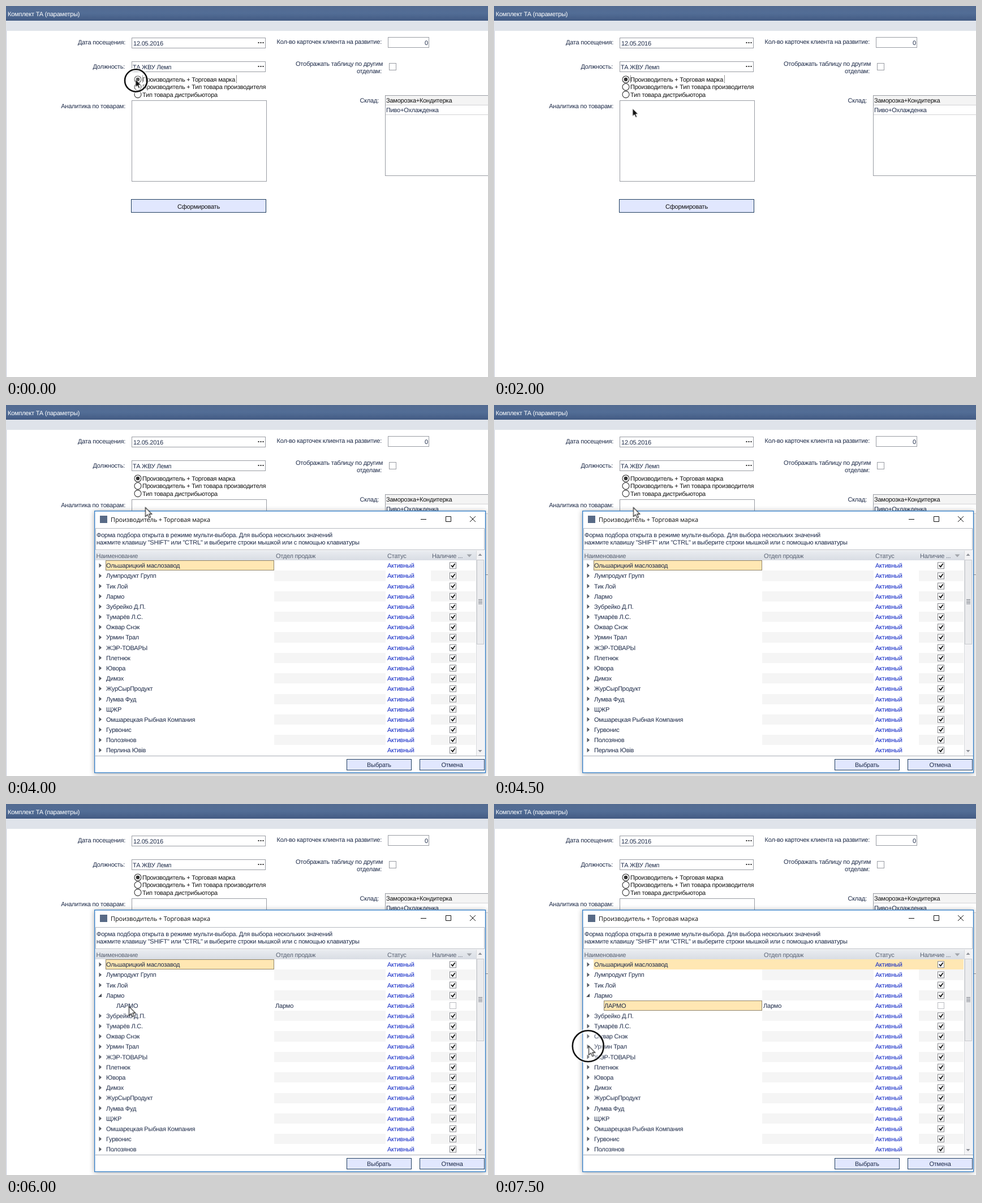
Animation of 852x657 px, one loop 8 s. Source, as an HTML page:

```html
<!DOCTYPE html>
<html lang="ru">
<head>
<meta charset="utf-8">
<title>Комплект ТА</title>
<style>
html, body { margin: 0; width: 100%; height: 100%; overflow: hidden; background: #fff; }
svg { display: block; width: 852px; height: 657px; }
text {
  font: 11px "Liberation Sans", Arial, sans-serif;
  letter-spacing: -.22px;
  text-rendering: geometricPrecision;
  fill: #1d2a48;
  white-space: pre;
}
.end { text-anchor: end; }
.mid { text-anchor: middle; }
.light { fill: #fff; }
.dark { fill: #111; }
.head { fill: #596273; }
.status { fill: #0a22c4; }
.caption { font-family: "Open Sans", "Noto Sans", sans-serif; letter-spacing: -.13px; fill: #111; }
.field { fill: #fff; stroke: #999ca3; }
.button { fill: #e1e7fe; stroke: #1f3d5e; }
.focus { fill: none; stroke: #222; stroke-dasharray: 1 1; }
.pick { fill: #ffe7b3; }
.shade { fill: #f5f5f5; shape-rendering: crispEdges; }
.frame { fill: #fff; stroke: #2c7ac6; stroke-width: 1.3; filter: drop-shadow(0 1px 5px #0005); }
.ring { fill: #fff3; stroke: #111; stroke-width: 2.6; }
.glow { fill: none; stroke: #fff; stroke-width: 7; opacity: .5; }

/* Every change is a hard cut */
.cut { animation: 8s step-end infinite; }
.press { animation-name: press; }
.tab { animation-name: tab; }
.marker { animation-name: marker; }
.dialog { animation-name: dialog; }
.closed { animation-name: closed; }
.opened { animation-name: opened; }
.shift { animation-name: shift; }
.first { animation-name: first; }
.second { animation-name: second; }
.tap { animation-name: tap; }
.move { animation-name: move; }
@keyframes press { 0% { opacity: 1 } 6.25%, to { opacity: 0 } }
@keyframes tab { 0% { opacity: 1 } 31.25%, to { opacity: 0 } }
@keyframes marker { 0% { opacity: 0 } 31.25%, to { opacity: 1 } }
@keyframes dialog { 0% { opacity: 0 } 50%, to { opacity: 1 } }
@keyframes closed { 0% { opacity: 1 } 62.5%, to { opacity: 0 } }
@keyframes opened { 0% { opacity: 0 } 62.5%, to { opacity: 1 } }
@keyframes shift { 0% { transform: none } 62.5%, to { transform: translateY(18.17px) } }
@keyframes first { 0% { opacity: 1 } 81.25%, to { opacity: 0 } }
@keyframes second { 0% { opacity: 0 } 81.25%, to { opacity: 1 } }
@keyframes tap { 0% { opacity: 0 } 93.75%, to { opacity: 1 } }
@keyframes move {
  0% { transform: translate(229px, 130px) }
  25% { transform: translate(245px, 181.5px) }
  31.25% { transform: translate(246.5px, 181.5px) }
  62.5% { transform: translate(166.5px, 342.5px) }
  68.75% { transform: translate(217.5px, 358.5px) }
  87.5%, to { transform: translate(167.5px, 428.5px) }
}
</style>
</head>
<body>
<svg id="stage" viewBox="0 0 852 657">
  <defs>
    <linearGradient id="bar" x2="0" y2="1">
      <stop stop-color="#536b91"/><stop offset=".5" stop-color="#526d96"/><stop offset="1" stop-color="#435b83"/>
    </linearGradient>
    <linearGradient id="cols" x2="0" y2="1">
      <stop stop-color="#e9ecf0"/><stop offset="1" stop-color="#d9dde4"/>
    </linearGradient>
    <clipPath id="list"><path d="M158 275H831V620.5H158Z"/></clipPath>
    <path id="arrow" d="M0 0V16L3.8 12.6L6.4 18.4L9 17.3L6.5 11.6H11.3Z"/>
  </defs>
</svg>
<script>
const text = (x, y, s, cls = '') => `<text x="${x}" y="${y}" class="${cls}">${s}</text>`;
const rect = (x, y, w, h, attr) => `<rect x="${x}" y="${y}" width="${w}" height="${h}" ${attr}/>`;
const box = (x, y, w, h, cls) => rect(x + .5, y + .5, w, h, `class="${cls}"`);
const path = (d, attr) => `<path d="${d}" ${attr}/>`;
const cut = (name, body) => `<g class="cut ${name}">${body}</g>`;
const dots = y => [446.5, 450.5, 454.5].map(x => rect(x - 1, y, 2, 2, 'fill="#222"')).join('');

const radio = (y, label, on) =>
  `<circle cx="233" cy="${y}" r="6" fill="#fff" stroke="#333" stroke-width="1.1"/>` +
  (on ? `<circle cx="233" cy="${y}" r="3.3" fill="#333"/>` : '') +
  text(241, y + 4, label, 'dark');

const ring = (x, y, r) =>
  `<circle cx="${x}" cy="${y}" r="${r}" class="glow"/><circle cx="${x}" cy="${y}" r="${r}" class="ring"/>`;

const form = () =>
  rect(0, 0, 852, 26, 'fill="url(#bar)"') + rect(0, 26, 852, 18, 'fill="#dfe3ea"') +
  rect(0, 44, 1, 613, 'fill="#c3c8d6"') +
  text(3, 17.5, 'Комплект ТА (параметры)', 'light') +
  text(211, 68, 'Дата посещения:', 'end') + box(222, 56, 236, 18, 'field') +
  text(225, 70, '12.05.2016') + dots(64) +
  text(664, 67, 'Кол-во карточек клиента на развитие:', 'end') +
  box(675, 55, 72, 18, 'field') + text(746, 68.5, '0', 'end') +
  text(210, 111, 'Должность:', 'end') + box(222, 98, 236, 18, 'field') +
  text(224, 112, 'ТА ЖВУ Лемп') + dots(106) +
  text(666, 106, 'Отображать таблицу по другим', 'end') +
  text(664, 118.5, 'отделам:', 'end') + box(677, 101, 12, 12, 'field') +
  radio(130, 'Производитель + Торговая марка', true) +
  radio(143.3, 'Производитель + Тип товара производителя') +
  radio(156.6, 'Тип товара дистрибьютора') +
  cut('tab', path('M241.5 123V137M407.5 123V137', 'class="focus"')) +
  text(211, 181, 'Аналитика по товарам:', 'end') + box(222, 167, 238, 143, 'field') +
  cut('marker', path('M228.5 191.5H232.5V189L237 193.5L232.5 198V195.5H228.5Z', 'fill="#a9a9b0" stroke="#55555c"')) +
  text(659, 171, 'Склад:', 'end') + box(670, 158, 200, 142, 'field') +
  rect(671, 159, 181, 16, 'fill="#f4f4f4"') +
  path('M671 175.5H852M671 192.5H852', 'stroke="#d3d3d6"') +
  text(672, 171, 'Заморозка+Кондитерка', 'dark') + text(672, 188, 'Пиво+Охлажденка') +
  box(221, 342, 238, 23, 'button') + text(340.5, 358.5, 'Сформировать', 'mid dark');

const makers = ['Ольшарицкий маслозавод', 'Лумпродукт Групп', 'Тик Лой', 'Лармо', 'Зубрейко Д.П.',
  'Тумарёв Л.С.', 'Ожвар Снэк', 'Урмин Трал', 'ЖЭР-ТОВАРЫ', 'Плетнюк', 'Ювора', 'Димэх',
  'ЖурСырПродукт', 'Лумва Фуд', 'ЩЖР', 'Омшарецкая Рыбная Компания', 'Гурвонис', 'Полозянов',
  'Перлина Ювів'];
const step = 18.17, top0 = 275.3;
const rowY = i => top0 + i * step;

const cells = (y, checked) =>
  text(674, y + 13, 'Активный', 'status') +
  rect(784.5, y + 3.5, 11, 11, `fill="#fff" stroke="${checked ? '#85878c' : '#b9bbc0'}"`) +
  (checked ? path(`M787 ${y + 8.5}L789.5 ${y + 11.5}L793.5 ${y + 5.8}`, 'fill="none" stroke="#111" stroke-width="1.8"') : '');
const marker = y => path(`M164.5 ${y + 5}L169 ${y + 9}L164.5 ${y + 13}Z`, 'fill="#555a63"');
const unfolded = y => path(`M169 ${y + 6}V${y + 12}H163Z`, 'fill="#444850"');
const row = (name, i) => {
  const y = rowY(i), m = marker(y);
  return (i === 3 ? cut('closed', m) + cut('opened', unfolded(y)) : m) +
    text(177, y + 13, name) + cells(y, true);
};

const rows = () => {
  let shade = '';
  for (let i = 1; i < 19; i += 2)
    shade += rect(474, rowY(i), 197, step, 'class="shade"') + rect(751, rowY(i), 79, step, 'class="shade"');
  const child = rowY(4);
  return `<g clip-path="url(#list)">${shade}` +
    cut('first', rect(176, 275, 298, 18, 'class="pick"') + box(176, 275, 297, 17, 'focus')) +
    cut('second', rect(176, 275, 654, 18, 'class="pick"') +
      rect(194, 348, 280, 18, 'class="pick"') + box(194, 348, 279, 17, 'focus')) +
    makers.slice(0, 4).map(row).join('') +
    cut('shift', makers.slice(4).map((n, i) => row(n, i + 4)).join('')) +
    cut('opened', text(195, child + 13, 'ЛАРМО') + text(476, child + 13, 'Лармо') + cells(child, false)) +
    '</g>';
};

const thumb = (h, grip) =>
  rect(832.5, 274.5, 12, h, 'fill="#ebecee" stroke="#c8cace"') +
  path([0, 2.5, 5, 7.5].map(d => `M835 ${grip + d}H842`).join(''), 'stroke="#777b84"');

const dialog = () =>
  rect(156.7, 187.8, 690.8, 463.4, 'class="frame"') +
  rect(166, 196, 13, 13, 'fill="#586a86"') +
  text(185, 206.5, 'Производитель + Торговая марка', 'caption') +
  path('M733 202.5H743M777.5 197.5H786.5V206.5H777.5ZM820 197L830 207M830 197L820 207', 'fill="none" stroke="#111"') +
  rect(158.5, 218.5, 687, 38, 'fill="#fff" stroke="#b4b8c0"') +
  text(160, 234, 'Форма подбора открыта в режиме мульти-выбора. Для выбора нескольких значений') +
  text(160, 246.5, 'нажмите клавишу "SHIFT" или "CTRL" и выберите строки мышкой или с помощью клавиатуры') +
  rect(158, 258, 688, 17, 'fill="url(#cols)"') +
  text(159.5, 271, 'Наименование', 'head') + text(477, 271, 'Отдел продаж', 'head') +
  text(674, 271, 'Статус', 'head') + text(753, 271, 'Наличие ...', 'head') +
  path('M814.5 264.5H823.5L819 269.5Z', 'fill="#a2a5ab"') +
  rows() +
  rect(831, 258, 15, 363, 'fill="#f3f3f5"') + path('M831.5 258V621', 'stroke="#d6d8dc"') +
  cut('closed', thumb(149, 344.5)) + cut('opened', thumb(145, 342.5)) +
  path('M834.5 267L838 263L841.5 267ZM834.5 611L838 615L841.5 611Z', 'fill="#8d9097"') +
  path('M158 621.5H847', 'stroke="#a8acb4"') +
  box(602, 627, 114, 19, 'button') + text(659.5, 641, 'Выбрать', 'mid') +
  box(731, 627, 114, 19, 'button') + text(788.5, 641, 'Отмена', 'mid');

const cursor = () => cut('move',
  cut('tab', '<use href="#arrow" transform="scale(.86)" fill="#111" stroke="#fff"/>') +
  cut('marker', '<use href="#arrow" fill="#fff" stroke="#111" stroke-width="1.1"/>'));

document.getElementById('stage').insertAdjacentHTML('beforeend',
  form() + cut('dialog', dialog()) +
  cut('press', ring(229.7, 132, 19.7)) + cut('tap', ring(166.3, 428.7, 27.5)) + cursor());
</script>
</body>
</html>
```
